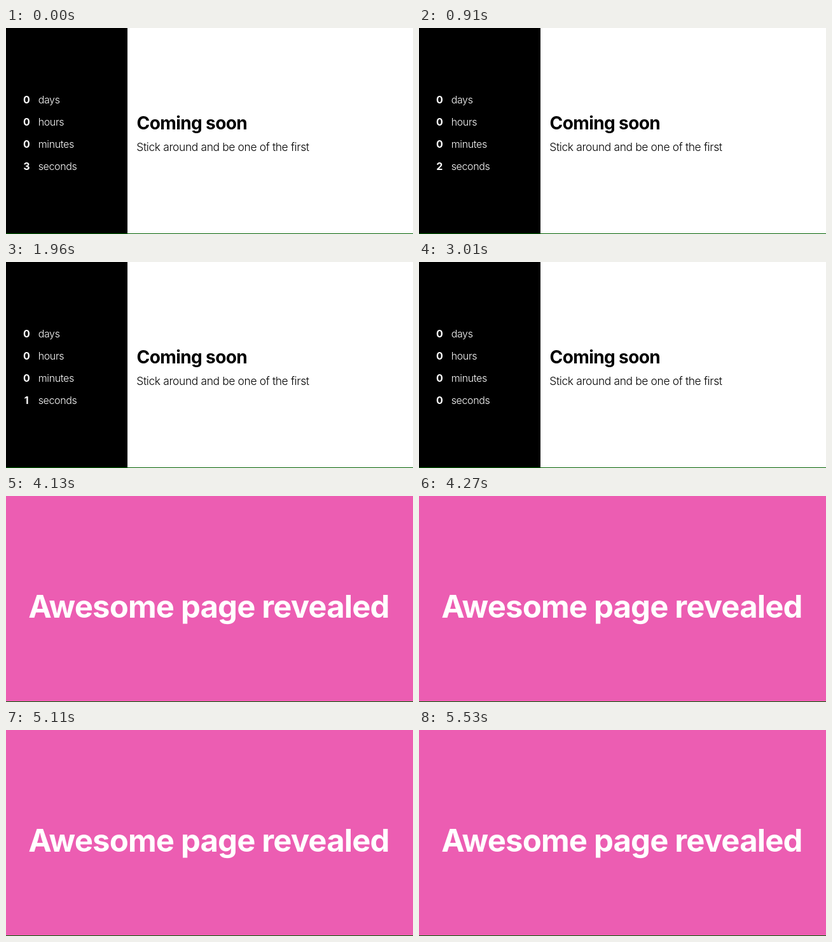
Write an HTML page that moves like this. It is 640 px wide and 325 px high and loops after 5.6 s.

```html
<!DOCTYPE html>
<html lang="en">
<head>
<meta charset="utf-8">
<title>Countdown</title>
<style>
  html, body { margin: 0; width: 100%; height: 100%; overflow: hidden; background: #fff; }
  svg { display: block; width: 100%; height: 100%; }
  text { font-family: Inter, "Liberation Sans", sans-serif; font-optical-sizing: none; white-space: pre; }
  .num { font-size: 16px; font-weight: 700; fill: #fff; text-anchor: middle; }
  .unit { font-size: 16px; font-weight: 300; letter-spacing: -0.023em; fill: #fff; }
  .title { font-size: 28px; font-weight: 700; letter-spacing: -0.022em; }
  .sub { font-size: 17.4px; font-weight: 300; letter-spacing: -0.02em; }
  .reveal { font-size: 49px; font-weight: 700; letter-spacing: -0.017em; fill: #fff; text-anchor: middle; }
</style>
</head>
<body>
<svg viewBox="0 0 640 325" preserveAspectRatio="none">
  <g id="soon">
    <rect width="640" height="325" fill="#fff"/>
    <rect width="191" height="325" fill="#000"/>
    <g id="rows"></g>
    <text class="title" x="205.6" y="159.5">Coming soon</text>
    <text class="sub" x="205.3" y="194.3">Stick around and be one of the first</text>
  </g>
  <g id="page" visibility="hidden">
    <rect width="640" height="325" fill="#ec5db2"/>
    <text class="reveal" x="318.9" y="192">Awesome page revealed</text>
  </g>
  <rect y="324" width="640" height="1" fill="#006000"/>
</svg>
<script>
  const LOOP = 5600, REVEAL = 4130;
  const ticks = [910, 1960, 3010];
  const $ = id => document.getElementById(id);

  function addText(cls, x, y, str) {
    const el = document.createElementNS("http://www.w3.org/2000/svg", "text");
    el.setAttribute("class", cls);
    el.setAttribute("x", x);
    el.setAttribute("y", y);
    el.textContent = str;
    $("rows").append(el);
    return el;
  }

  let seconds;
  ["days", "hours", "minutes", "seconds"].forEach((unit, i) => {
    const y = 118.7 + 35 * i;
    seconds = addText("num", 32.3, y, "0");
    addText("unit", 50.7, y, unit);
  });

  function render(t) {
    const open = t >= REVEAL;
    $("soon").setAttribute("visibility", open ? "hidden" : "visible");
    $("page").setAttribute("visibility", open ? "visible" : "hidden");
    seconds.textContent = 3 - ticks.filter(at => t >= at).length;
  }

  const start = performance.now();
  function frame() {
    render((performance.now() - start) % LOOP);
    requestAnimationFrame(frame);
  }
  frame();
</script>
</body>
</html>
```
